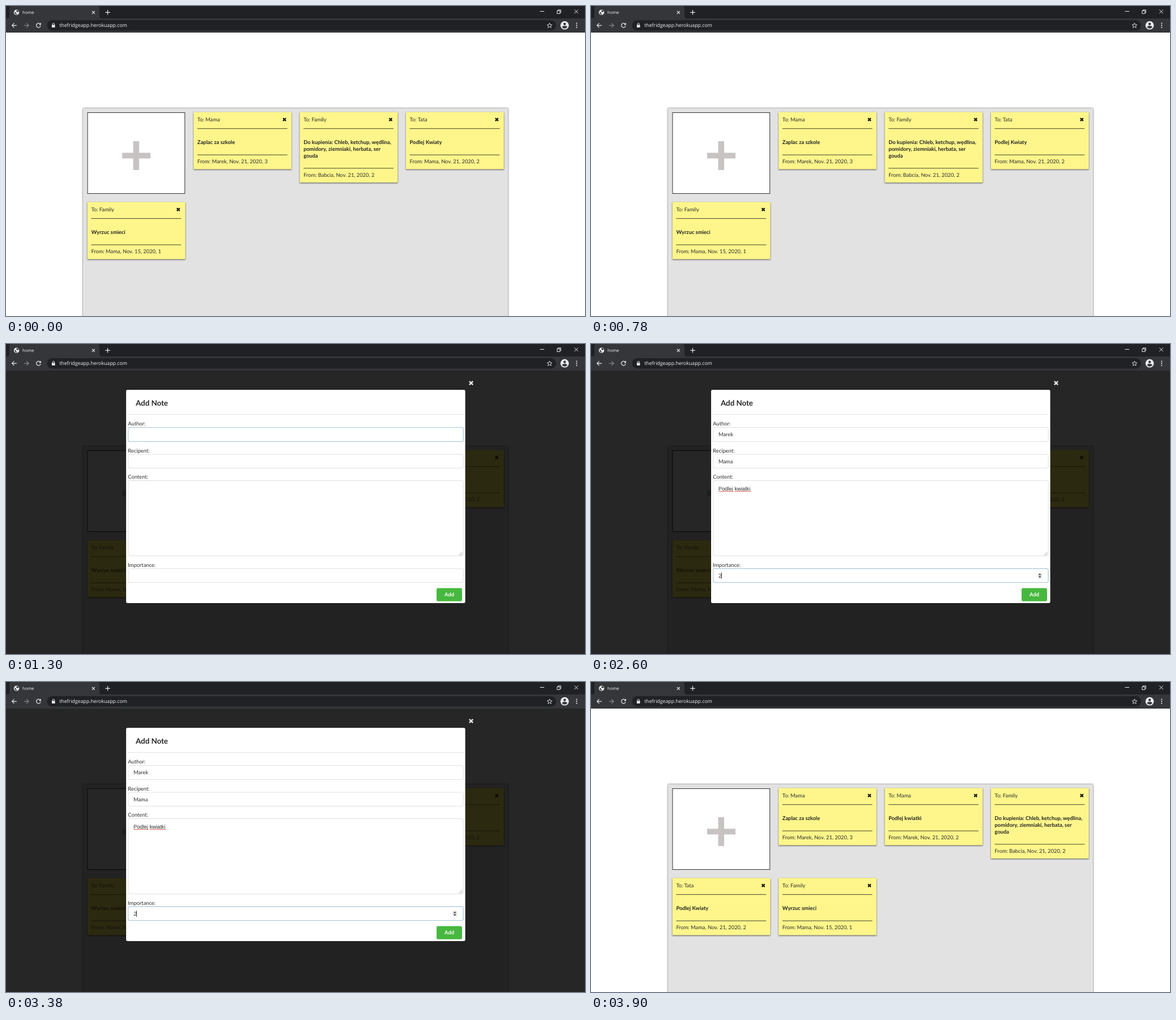
Animation, 1022 px wide and 548 px high, one loop 5200 ms. Source, as an HTML page:

```html
<!DOCTYPE html>
<html lang="en">
<head>
<meta charset="utf-8">
<title>home</title>
<style>
  html, body { margin: 0; width: 100%; height: 100%; overflow: hidden; background: #fff; }
  svg { display: block; width: 100%; height: 100%; }
  text { font: 9.31px Lato, sans-serif; fill: #2b2b2b; text-rendering: geometricPrecision; white-space: pre; }
  .bold { font-weight: 700; fill: #222; }
  .title { font-size: 13.3px; font-weight: 700; fill: #262626; }
  .plain { font-family: "Liberation Sans", Arial, sans-serif; }
  .ui { font-family: "Open Sans", "Noto Sans", sans-serif; fill: #f1f3f4; }
  .note rect { fill: #fef68b; filter: drop-shadow(0 1px 1.3px rgba(0, 0, 0, .65)); }
  .note path { stroke: #45432f; }
  .note use { stroke: #000; }
  .field { fill: #fff; stroke: #e0e0e1; }
  .focus { fill: none; stroke: #a3c4d9; }
  .icon { fill: none; stroke: #e8eaed; stroke-width: 1.2; }

  /* One screen per quarter of the loop, with hard cuts */
  .before, .after, .modal, .empty, .filled { animation: 5.2s step-end infinite; }
  .before { animation-name: before; }
  .after { animation-name: after; }
  .modal { animation-name: modal; }
  .empty { animation-name: empty; }
  .filled { animation-name: filled; }
  @keyframes before { 0% { visibility: visible } 75%, 100% { visibility: hidden } }
  @keyframes after { 0% { visibility: hidden } 75%, 100% { visibility: visible } }
  @keyframes modal { 0% { visibility: hidden } 25% { visibility: visible } 75%, 100% { visibility: hidden } }
  @keyframes empty { 0% { visibility: hidden } 25% { visibility: visible } 50%, 100% { visibility: hidden } }
  @keyframes filled { 0% { visibility: hidden } 50% { visibility: visible } 75%, 100% { visibility: hidden } }
</style>
</head>
<body>
<svg viewBox="0 0 1022 548">
  <defs>
    <path id="cross" d="M-2.5-2.5 2.5 2.5M2.5-2.5-2.5 2.5" fill="none"/>
  </defs>

  <!-- Board -->
  <rect width="1022" height="548" fill="#fff"/>
  <rect x="136" y="181" width="750" height="380" fill="#e2e2e2" style="filter:drop-shadow(0 0 1.5px rgba(0,0,0,.7))"/>
  <rect x="144" y="188.5" width="171.7" height="143" fill="#fff" stroke="#333"/>
  <path d="M224.5 239h10.5v20.5h20v10h-20V290h-10.5v-20.5h-19.5v-10h19.5z" fill="#c8c3c3"/>
  <g id="before" class="before"></g>
  <g id="after" class="after"></g>

  <!-- Dialog -->
  <g class="modal">
    <rect y="46" width="1022" height="502" fill="#000" fill-opacity=".85"/>
    <path d="M706 187.5h172.8V289H706zM143.7 347h172.8v100.5H143.7z" fill="#463700" fill-opacity=".2"/>
    <use href="#cross" transform="translate(821 69) scale(1.25)" stroke="#e3e3e3" stroke-width="2"/>
    <rect x="212" y="81" width="598.6" height="377" rx="2.7" fill="#fff"/>
    <text class="title" x="229" y="109.3">Add Note</text>
    <path d="M215 124.5h593" stroke="#e2e2e2"/>
    <g id="form"></g>
    <path d="M800 373.5l5.5-5.5M803 373.5l2.5-2.5" stroke="#8a8a8a" stroke-width=".8"/>
    <rect x="760" y="431.5" width="45" height="23.3" rx="2.5" fill="#47b83f"/>
    <text class="bold" x="782.5" y="446.3" text-anchor="middle" style="fill:#fff">Add</text>
  </g>
  <rect class="focus empty" x="215.5" y="147.5" width="591.7" height="25" rx="2.5"/>
  <g class="filled">
    <rect class="focus" x="215.5" y="397" width="591.7" height="24.5" rx="2.5"/>
    <text x="225" y="163.3">Marek</text>
    <text x="225" y="210.7">Mama</text>
    <text class="plain" x="225" y="258.5">Podlej kwiatki</text>
    <path d="M225 260.5h26M253.5 260.5h28.5" stroke="#e0483e" stroke-width=".9"/>
    <text x="225" y="412.7">2</text>
    <path d="M230.5 404v11" stroke="#222" stroke-width=".9"/>
    <rect x="787.5" y="404" width="9.5" height="11" rx="1" fill="#efefef"/>
    <path d="M789.6 408.6l2.6-3 2.6 3zM789.6 410.4l2.6 3 2.6-3z" fill="#444"/>
  </g>

  <!-- Browser bar -->
  <rect width="1022" height="47" fill="#202124"/>
  <path d="M0 47V22h2q4 0 4-4V4q0-4 4-4h151q4 0 4 4v14q0 4 4 4h853v25z" fill="#35363a"/>
  <rect x="72.5" y="25" width="898.5" height="18.6" rx="9.3" fill="#202124"/>
  <circle cx="18.6" cy="11.2" r="4.7" fill="#f1f3f4"/>
  <path d="M15 10.2l2.8 1.4.2 1.6 1.2 1v1.2q-3.6-.6-4.2-5.2zM18.4 7.4l3 .4 1 2.4-2.4.8-1.6-1.2z" fill="#35363a"/>
  <text class="ui" x="29" y="13.9" style="font-size:7.6px">home</text>
  <text class="ui" x="94.2" y="37.4" style="font-size:8.77px">thefridgeapp.herokuapp.com</text>
  <g class="icon">
    <use href="#cross" x="154.3" y="11.3"/>
    <path d="M175.3 11.3h8.4M179.5 7.1v8.4"/>
    <path d="M942.5 9.5h7.5M972.8 8.5h5v5h-5zM974.3 8v-1.2h5v5h-1.2M1003.3 6.5l6.6 6.6M1009.9 6.5l-6.6 6.6" stroke-width="1"/>
    <path d="M18.9 34.3h-8M14.5 30.4l-3.9 3.9 3.9 3.9"/>
    <path d="M31.8 34.3h8M36.2 30.4l3.9 3.9-3.9 3.9" stroke="#85878b"/>
    <path d="M60.5 32a3.8 3.8 0 1 0 .6 3.2M61.2 30v2.8h-2.8"/>
    <path d="M82 33.8v-1.6a1.7 1.7 0 0 1 3.4 0v1.6" stroke-width="1"/>
    <path d="M959.4 30l1.2 3 3.2.2-2.5 2 .9 3.1-2.8-1.7-2.8 1.7.9-3.1-2.5-2 3.2-.2z" stroke-width=".9"/>
  </g>
  <g fill="#e8eaed">
    <rect x="80.9" y="33.2" width="5.6" height="4.7" rx=".6"/>
    <circle cx="986.1" cy="34.2" r="7.4"/>
    <circle cx="1007.3" cy="30.6" r="1.1"/>
    <circle cx="1007.3" cy="34.2" r="1.1"/>
    <circle cx="1007.3" cy="37.8" r="1.1"/>
  </g>
  <g fill="#35363a">
    <circle cx="986.1" cy="31.7" r="2.2"/>
    <path d="M981.6 37.6q0-2.6 4.5-2.6t4.5 2.6q-1.8 2.2-4.5 2.2t-4.5-2.2z"/>
  </g>
</svg>
<script>
  const byId = id => document.getElementById(id);

  const pay = ["Mama", ["Zaplac za szkole"], "Marek, Nov. 21, 2020, 3"];
  const shop = ["Family", ["Do kupienia: Chleb, ketchup, wędlina,", "pomidory, ziemniaki, herbata, ser", "gouda"],
    "Babcia, Nov. 21, 2020, 2"];
  const water = ["Tata", ["Podlej Kwiaty"], "Mama, Nov. 21, 2020, 2"];
  const trash = ["Family", ["Wyrzuc smieci"], "Mama, Nov. 15, 2020, 1"];
  const added = ["Mama", ["Podlej kwiatki"], "Marek, Nov. 21, 2020, 2"];

  function note([to, lines, from], i) {
    const slot = i + 1; // the first slot holds the plus tile
    const x = 143.7 + slot % 4 * 187.4;
    const y = 187.5 + Math.floor(slot / 4) * 159;
    const grow = (lines.length - 1) * 11.8;
    const body = lines.map((s, n) => `<text class="bold" x="6.7" y="${56.4 + n * 11.9}">${s}</text>`).join("");
    return `<g class="note" transform="translate(${x} ${y})">
      <rect width="172.8" height="${101 + grow}"/>
      <text x="6.7" y="16.8">To: ${to}</text>
      <use href="#cross" x="160.4" y="13.3" stroke-width="2"/>
      <path d="M6.7 29.2h158.8M6.7 ${75.7 + grow}h158.8"/>
      ${body}<text x="6.7" y="${90.6 + grow}">From: ${from}</text></g>`;
  }

  const field = ([label, y, h]) =>
    `<text x="215.3" y="${y - 3.5}">${label}:</text>
     <rect class="field" x="215.5" y="${y}" width="591.7" height="${h}" rx="2.5"/>`;

  byId("before").innerHTML = [pay, shop, water, trash].map(note).join("");
  byId("after").innerHTML = [pay, added, shop, water, trash].map(note).join("");
  byId("form").innerHTML = [["Author", 147.5, 25], ["Recipent", 195, 24.5],
    ["Content", 241.5, 133], ["Importance", 397, 24.5]].map(field).join("");
</script>
</body>
</html>
```
